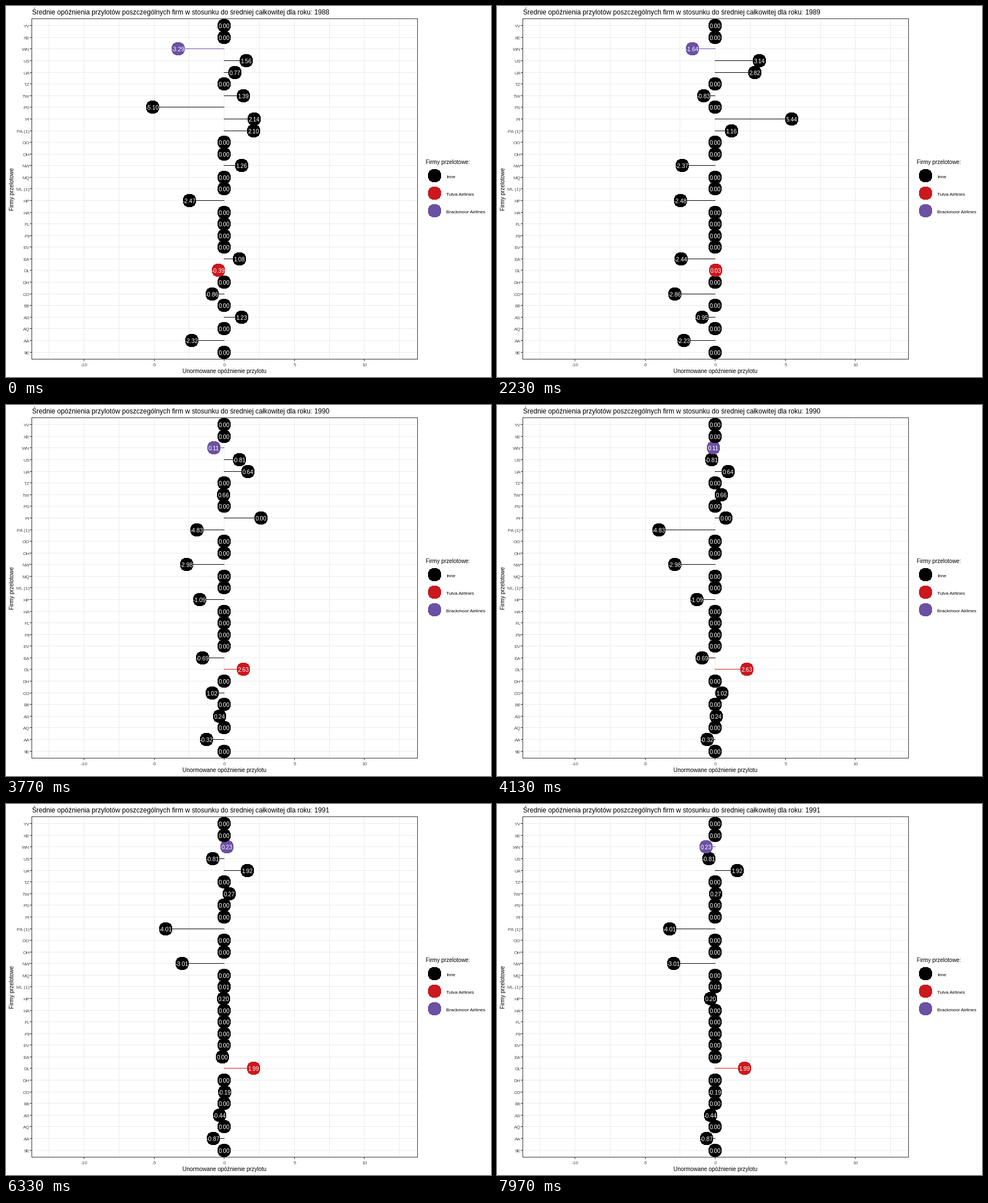
Recreate the animation shown at these times as a matplotlib script. Size 855 px wide and 655 px high, loop 8 s.

```python
import numpy as np
import matplotlib.pyplot as plt
from matplotlib.animation import FuncAnimation
from matplotlib.collections import EllipseCollection, LineCollection

W, H, DPI = 855, 655, 100
PX = 72 / DPI                      # one pixel in points
LOOP, STEP = 8000, 25              # ms
FPS = 30
FIRST, PERIOD, MOVE = 22, 68, 45   # in ticks of 1/30 s
X0, XSCALE = 384.6, 24.72
Y0, YSCALE = 611.05, 20.58
DOT = 23
LEFT, RIGHT, TOP, BOTTOM = 45, 725, 22, 623

BLACK, RED, PURPLE = "#000000", "#CB181D", "#6A51A3"
FRAME, GRID, TICK = "#333333", "#EBEBEB", "#4D4D4D"

CODES = ("9E,AA,AQ,AS,B6,CO,DH,DL,EA,EV,F9,FL,HA,HP,ML (1),MQ,NW,OH,OO,"
         "PA (1),PI,PS,TW,TZ,UA,US,WN,XE,YV").split(",")
# yearly deviation from the mean, 1988 onwards; carriers not listed stay at 0
DELAYS = {
    "AA": (-2.32, -2.23, -0.32, -0.87, 0.38),
    "AS": (1.23, -0.95, 0.24, -0.44, 0.05),
    "CO": (-0.86, -2.86, 1.02, -0.19, 0.80),
    "DL": (-0.39, 0.03, 2.63, 1.99, 2.59),
    "EA": (1.08, -2.44, -0.69, 0, 0),
    "HP": (-2.47, -2.48, -1.09, 0.20, -2.64),
    "ML (1)": (0, 0, 0, 0.01, 0),
    "NW": (1.26, -2.37, -2.98, -3.01, -2.65),
    "PA (1)": (2.10, 1.16, -4.83, -4.01, 0),
    "PI": (2.14, 5.44, 0, 0, 0),
    "PS": (-5.10, 0, 0, 0, 0),
    "TW": (1.39, -0.83, 0.66, 0.27, -0.93),
    "UA": (0.77, 2.82, 0.64, 1.92, 0.05),
    "US": (1.56, 3.14, -0.81, -0.81, 1.17),
    "WN": (-3.29, -1.64, 0.11, 0.23, -4.35),
}
TITLE = ("Średnie opóźnienia przylotów poszczególnych firm w stosunku "
         "do średniej całkowitej dla roku: {}")
LEGEND = (("Inne", BLACK), ("Tulva Airlines", RED), ("Brackmoor Airlines", PURPLE))

data = np.array([DELAYS.get(c, (0,) * 5) for c in CODES]).T
colors = [{"DL": RED, "WN": PURPLE}.get(c, BLACK) for c in CODES]

plt.rcParams["font.family"] = "Liberation Sans"
fig = plt.figure(figsize=(W / DPI, H / DPI), dpi=DPI, facecolor="white")
ax = fig.add_axes([0, 0, 1, 1])
ax.set_xlim(0, W)
ax.set_ylim(H, 0)
ax.axis("off")


def cell(p):
    """Centre of the pixel that holds p."""
    return np.floor(p) + 0.5


def to_x(v):
    return cell(X0 + XSCALE * np.asarray(v))


def lines(segs, color, z):
    coll = LineCollection(segs, colors=color, linewidths=PX, antialiaseds=False,
                          capstyle="butt", zorder=z)
    coll.set_snap(False)
    ax.add_collection(coll, autolim=False)
    return coll


def dots(x, y, color):
    size = np.full(len(y), DOT)
    coll = EllipseCollection(size, size, 0 * size, units="x",
                             offsets=np.column_stack([x, y]),
                             offset_transform=ax.transData, facecolors=color,
                             linewidths=0, antialiaseds=False, zorder=4)
    ax.add_collection(coll, autolim=False)
    return coll


def text(x, y, s, size, color=BLACK, ha="left", rot=0):
    return ax.text(x, y, s, fontsize=size * PX, color=color, ha=ha, va="baseline",
                   rotation=rot, rotation_mode="anchor", zorder=6)


# panel
ys = cell(Y0 - YSCALE * np.arange(len(CODES)))
xticks = np.arange(-10, 11, 5)
zero = float(to_x(0))
lines([[(x, TOP), (x, BOTTOM)] for x in to_x(np.arange(-12.5, 13, 2.5))]
      + [[(LEFT, y), (RIGHT, y)] for y in ys], GRID, 1)
lines([[(LEFT, y + 0.5), (RIGHT + 1, y + 0.5)] for y in (TOP, BOTTOM)]
      + [[(x + 0.5, TOP), (x + 0.5, BOTTOM + 1)] for x in (LEFT, RIGHT)]
      + [[(LEFT - 3, y), (LEFT, y)] for y in ys]
      + [[(x, BOTTOM + 1), (x, BOTTOM + 4)] for x in to_x(xticks)], FRAME, 2)

for code, y in zip(CODES, ys):
    text(41.5, y + 3.6, code, 8.3, TICK, "right")
for v in xticks:
    text(to_x(v), 636, str(v), 8.3, TICK, "center")
text(385.3, 648, "Unormowane opóźnienie przylotu", 10, ha="center")
text(14, 323, "Firmy przelotowe", 10, ha="center", rot=90)
title = text(45.5, 15, "", 11.9)

# legend
text(739.5, 279, "Firmy przelotowe:", 9.9)
keys = 299.5 + 31 * np.arange(len(LEGEND))
dots(np.full(len(keys), 755.5), keys, [color for _, color in LEGEND])
for (name, _), y in zip(LEGEND, keys):
    text(776, y + 4.4, name, 8.3)

# moving parts
stems = lines([], colors, 3)
points = dots(np.full(len(ys), zero), ys, colors)
values = [text(zero, y + 4.5, "", 10.3, "white", "center") for y in ys]


def draw(i):
    tick = int((i * STEP + 20) * FPS / 1000)
    state, j = divmod(tick - FIRST, PERIOD)
    u = min(j / MOVE, 1)
    ease = (1 - np.cos(np.pi * u)) / 2
    xs = to_x(data[state] * (1 - ease) + data[state + 1] * ease)
    shown = state + (u >= 0.5)

    title.set_text(TITLE.format(1988 + shown))
    stems.set_segments([[(zero, y), (x, y)] for x, y in zip(xs, ys)])
    points.set_offsets(np.column_stack([xs, ys]))
    for label, x, v in zip(values, xs, data[shown]):
        label.set_x(x)
        label.set_text(f"{v:.2f}")
    return [title, stems, points, *values]


anim = FuncAnimation(fig, draw, frames=LOOP // STEP, interval=STEP,
                     repeat=True, repeat_delay=0, blit=False)
plt.show()
```
